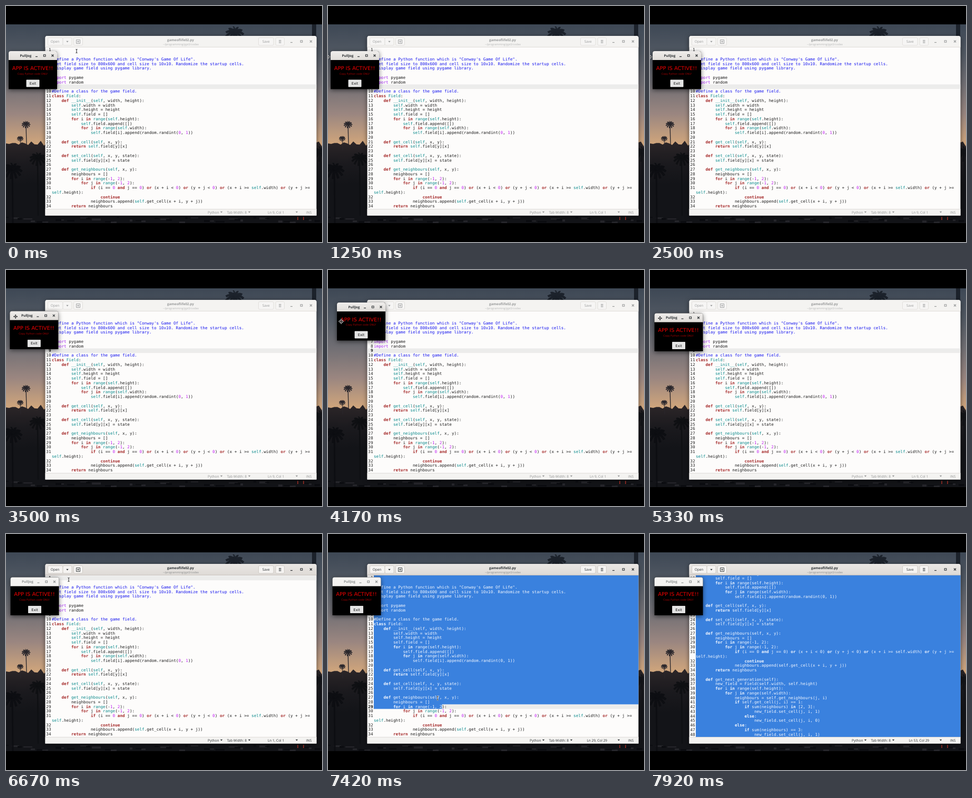
Recreate the animation shown at these times as an HTML page with a canvas. Size 600 by 450 pixels, loop 8000 ms.

```html
<!DOCTYPE html>
<html lang="en">
<head>
<meta charset="utf-8">
<title>Code editor</title>
<style>
html, body { margin: 0; width: 100%; height: 100%; overflow: hidden; background: #000; }
canvas { display: block; width: 600px; height: 450px; }
</style>
</head>
<body>
<canvas id="stage" width="600" height="450"></canvas>
<script>
const ctx = document.getElementById('stage').getContext('2d');
ctx.textRendering = 'geometricPrecision';

const LOOP = 8000, TICK = 1000 / 12;
const CODE_X = 87, CHAR_W = 4.623, ROW_H = 8.76, ROW_Y = 83.8;
const MONO = '7.68px "DejaVu Sans Mono", monospace';
const UI = '"Open Sans", sans-serif';
const BLUE = '#3a81de';
const FOCUS_AT = 5650, SELECT_AT = 6750;

const SOURCE = `

#Define a Python function which is "Conway's Game Of Life".
#Set field size to 800x600 and cell size to 10x10. Randomize the startup cells.
#Display game field using pygame library.

import pygame
import random

#Define a class for the game field.
class Field:
    def __init__(self, width, height):
        self.width = width
        self.height = height
        self.field = []
        for i in range(self.height):
            self.field.append([])
            for j in range(self.width):
                self.field[i].append(random.randint(0, 1))

    def get_cell(self, x, y):
        return self.field[y][x]

    def set_cell(self, x, y, state):
        self.field[y][x] = state

    def get_neighbours(self, x, y):
        neighbours = []
        for i in range(-1, 2):
            for j in range(-1, 2):
                if (i == 0 and j == 0) or (x + i < 0) or (y + j < 0) or (x + i >= self.width) or (y + j >=
~self.height):
                    continue
                neighbours.append(self.get_cell(x + i, y + j))
        return neighbours

    def get_next_generation(self):
        new_field = Field(self.width, self.height)
        for i in range(self.height):
            for j in range(self.width):
                neighbours = self.get_neighbours(j, i)
                if self.get_cell(j, i) == 1:
                    if sum(neighbours) in [2, 3]:
                        new_field.set_cell(j, i, 1)
                    else:
                        new_field.set_cell(j, i, 0)
                else:
                    if sum(neighbours) == 3:
                        new_field.set_cell(j, i, 1)`;

const KEYWORD = /^(def|class|for|in|if|and|or|return|continue|else)$/;

function tokenize(line) {
  let previous = '';
  return [...line.matchAll(/#.*|\w+|[^\w\s]+/g)].map(match => {
    const word = match[0];
    let color = '#1c1c1c', bold = false;
    if (word[0] === '#') color = '#1414ee';
    else if (KEYWORD.test(word)) { color = '#a52a2a'; bold = true; }
    else if (word === 'import') color = '#a020f0';
    else if (/^\d+$/.test(word)) color = '#c01cf4';
    else if (/^(self|range|sum)$/.test(word) || /^(def|class)$/.test(previous)) color = '#0b8a8c';
    previous = word;
    return { word, color, bold, col: match.index };
  });
}

// A leading "~" marks the wrapped rest of the line above.
let lineCount = 0;
const rows = SOURCE.split('\n').map(line => {
  const wrapped = line[0] === '~';
  return { number: wrapped ? '' : ++lineCount, tokens: tokenize(line.replace('~', '')) };
});
const WRAPPED_ROW = rows.findIndex(row => row.number === '');

const clamp = (v, lo, hi) => Math.min(hi, Math.max(lo, v));

// Eased value between keys of the form [time, ...values].
function track(t, keys) {
  let i = 0;
  while (i < keys.length - 2 && t >= keys[i + 1][0]) i++;
  const [a, b] = [keys[i], keys[i + 1]];
  const u = clamp((t - a[0]) / (b[0] - a[0]), 0, 1);
  const eased = u * u * (3 - 2 * u);
  return a.slice(1).map((v, k) => v + (b[k + 1] - v) * eased);
}

function rect(x, y, w, h, fill, radius = 0, stroke) {
  ctx.beginPath();
  ctx.roundRect(x, y, w, h, radius);
  ctx.fillStyle = fill;
  ctx.fill();
  if (stroke) { ctx.strokeStyle = stroke; ctx.lineWidth = 0.8; ctx.stroke(); }
}

function text(str, x, y, font, color, align = 'left') {
  ctx.font = font;
  ctx.fillStyle = color;
  ctx.textAlign = align;
  ctx.fillText(str, x, y);
}

function lines(color, width, ...paths) {
  ctx.strokeStyle = color;
  ctx.lineWidth = width;
  ctx.beginPath();
  for (const [x, y, ...rest] of paths) {
    ctx.moveTo(x, y);
    for (let i = 0; i < rest.length; i += 2) ctx.lineTo(rest[i], rest[i + 1]);
  }
  ctx.stroke();
}

function polygon(color, ...points) {
  ctx.fillStyle = color;
  ctx.beginPath();
  for (let i = 0; i < points.length; i += 2) ctx.lineTo(points[i], points[i + 1]);
  ctx.fill();
}

function gradient(y0, y1, ...colors) {
  const g = ctx.createLinearGradient(0, y0, 0, y1);
  colors.forEach((c, i) => g.addColorStop(i / (colors.length - 1), c));
  return g;
}

function withShadow(blur, draw) {
  ctx.save();
  ctx.shadowColor = 'rgba(0,0,0,.55)';
  ctx.shadowBlur = blur;
  ctx.shadowOffsetY = 2;
  draw();
  ctx.restore();
}

function palm(x, y, radius, base, color) {
  lines(color, radius / 6, [x, y, x + 1, base]);
  ctx.lineWidth = radius / 4;
  for (let i = 0; i < 11; i++) {
    const a = i / 11 * Math.PI * 2;
    const endX = x + Math.cos(a) * radius, endY = y + Math.sin(a) * radius * 0.8;
    ctx.beginPath();
    ctx.moveTo(x, y);
    ctx.quadraticCurveTo((x + endX) / 2, (y + endY) / 2 - radius * 0.25, endX, endY + radius * 0.2);
    ctx.stroke();
  }
}

function drawBackdrop() {
  rect(0, 0, 600, 450, '#000');
  ctx.save();
  ctx.beginPath();
  ctx.rect(0, 35, 600, 379);
  ctx.clip();
  rect(0, 35, 600, 379, gradient(35, 262, '#3e4855', '#525963', '#716f74', '#9a8680', '#cfa57c'));
  const ridge = [];
  for (let x = 0; x <= 600; x += 6) ridge.push(x, 262 + 4 * Math.sin(x * 0.37) + 3 * Math.sin(x * 1.7));
  polygon(gradient(258, 340, '#2c2628', '#1b1a1e', '#131418'), 0, 414, ...ridge, 600, 414);
  for (let i = 0; i < 40; i++) {
    rect((i * 47) % 600, 402 + (i * 7) % 10, 5 + i % 5 * 3, 2 + i % 3, i % 2 ? '#26262b' : '#0c0d11');
  }
  rect(553, 402, 2, 6, '#8a2a24');
  rect(564, 402, 2, 6, '#8a2a24');
  palm(38, 225, 8, 264, '#2a272c');
  palm(27, 252, 6, 275, '#2a272c');
  palm(60, 290, 15, 400, '#0f1013');
  palm(12, 312, 18, 414, '#0d0e12');
  palm(597, 280, 17, 414, '#131418');
  palm(434, 51, 17, 80, '#1c222b');
  rect(581, 35, 8, 24, '#1c222b');
  ctx.restore();
}

function windowButtons(xMin, xMax, xClose, y, color) {
  lines(color, 1.2, [xMin - 2, y + 2, xMin + 2, y + 2]);
  lines(color, 1.1, [xMax - 1.8, y - 1.8, xMax + 1.8, y - 1.8, xMax + 1.8, y + 1.8, xMax - 1.8, y + 1.8, xMax - 1.8, y - 2.2]);
  lines(color, 1.1, [xClose - 2, y - 2, xClose + 2, y + 2], [xClose + 2, y - 2, xClose - 2, y + 2]);
}

const arrowDown = (x, y, color) => polygon(color, x - 2.2, y - 1.2, x + 2.2, y - 1.2, x, y + 1.6);

function drawHeader(active) {
  const ink = active ? '#2c3134' : '#989a9a';
  const border = active ? '#c9c4be' : '#dedbd7';
  rect(74.5, 57, 515, 21.5, active ? gradient(57, 78, '#eae7e4', '#dedad6') : '#f4f3f1', [4, 4, 0, 0]);
  lines(active ? '#bfb8b1' : '#d9d5d0', 0.8, [74.5, 78.4, 589.5, 78.4]);
  for (const [x, w] of [[79.5, 28.5], [108, 17], [128.5, 17], [479.5, 28.5], [512, 16.5]]) {
    rect(x, 60.5, w, 14.5, active ? '#f5f3f1' : '#f6f5f4', 2, border);
  }
  text('Open', 93, 70.4, `6.5px ${UI}`, ink, 'center');
  text('Save', 493.7, 70.4, `6.5px ${UI}`, ink, 'center');
  arrowDown(116.5, 68, ink);
  lines(ink, 0.9, [133.5, 64.5, 140.5, 64.5, 140.5, 71.5, 133.5, 71.5, 133.5, 64.5], [137, 66, 137, 70], [135, 68, 139, 68]);
  lines(ink, 1, [518, 65.5, 522.5, 65.5], [518, 67.8, 522.5, 67.8], [518, 70.1, 522.5, 70.1]);
  text('gameoflife02.py', 331.5, 66.8, `700 6.4px ${UI}`, ink, 'center');
  text('~/programming/gpt3/codex', 332, 74.5, `5.3px ${UI}`, active ? '#888a8a' : '#b5b6b6', 'center');
  windowButtons(542, 561, 579, 67.5, ink);
}

function drawStatus(active, line, col) {
  const ink = active ? '#2c3134' : '#929494', font = `6.5px ${UI}`;
  rect(74.5, 387, 515, 12.5, '#f4f3f1');
  lines('#dad6d2', 0.8, [74.5, 387.4, 589.5, 387.4]);
  text('Python', 383, 395.7, font, ink);
  text('Tab Width: 8', 419.5, 395.7, font, ink);
  text(`Ln ${line}, Col ${col}`, line > 9 ? 491.5 : 497, 395.7, font, ink);
  text('INS', 570, 395.7, font, ink);
  for (const x of [409, 462, 552]) arrowDown(x, 393, ink);
}

function drawRows(scroll, forcedColor) {
  rows.forEach((row, i) => {
    const y = ROW_Y + (i - scroll) * ROW_H + 2.6;
    if (y < 72 || y > 396) return;
    for (const { word, color, bold, col } of row.tokens) {
      text(word, CODE_X + col * CHAR_W, y, (bold ? 'bold ' : '') + MONO, forcedColor || color);
    }
  });
}

function drawEditor(t) {
  const active = t >= FOCUS_AT;
  const [scroll] = track(t, [[7560, 0], [7910, 13.95]]);
  const [selRow, selCol] = track(t, [[SELECT_AT, 0, 0], [7420, 28, 28], [7600, 36, 28], [7910, 53, 28]]).map(Math.round);
  const currentRow = active ? selRow : 8;
  const rowTop = i => ROW_Y + (i - scroll - 0.5) * ROW_H;

  withShadow(9, () => rect(74.5, 57, 515, 342.5, '#fdfcfb', [4, 4, 0, 0]));
  ctx.save();
  ctx.beginPath();
  ctx.rect(74.5, 78, 515, 309);
  ctx.clip();
  rect(74.5, rowTop(currentRow), 515, ROW_H, '#ececeb');
  rows.forEach(({ number }, i) => {
    const weight = i === currentRow ? 'bold ' : '';
    text(number, 85.5, rowTop(i) + ROW_H / 2 + 2.6, weight + MONO, '#1c1c1c', 'right');
  });
  drawRows(scroll);
  if (t > SELECT_AT) {
    ctx.beginPath();
    ctx.rect(CODE_X, rowTop(0) - 1, 503, selRow * ROW_H + 1);
    ctx.rect(CODE_X, rowTop(selRow), selCol * CHAR_W, ROW_H);
    ctx.clip();
    ctx.fillStyle = BLUE;
    ctx.fillRect(CODE_X, 78, 503, 309);
    drawRows(scroll, '#f4f8ff');
  }
  ctx.restore();
  drawHeader(active);
  const line = currentRow + (currentRow < WRAPPED_ROW ? 1 : 0);
  drawStatus(active, line, active ? selCol + 1 : 1);
}

function drawPopup(t) {
  const [x, y] = track(t, [[3300, 5, 86], [3900, 14, 57], [4080, 16, 58], [4167, 17, 62], [4500, 8.5, 82.5]]);
  const active = t < FOCUS_AT, ink = active ? '#2c3134' : '#8d9090';
  const dejavu = '"DejaVu Sans", sans-serif';
  ctx.save();
  ctx.translate(x, y);
  withShadow(8, () => rect(0, 0, 92, 72.5, '#000', [4, 4, 0, 0]));
  rect(0, 0, 92, 17, active ? gradient(0, 17, '#efedeb', '#e0ddd9') : '#f4f3f1', [4, 4, 0, 0]);
  text('PullJog', 32.5, 10.9, `700 6.4px ${UI}`, ink, 'center');
  windowButtons(53, 68.2, 83.5, 8.5, ink);
  text('APP IS ACTIVE!!', 45.5, 35.9, `9.9px ${dejavu}`, '#f00000', 'center');
  text('Copy Python code ONLY', 45.5, 44.5, `4.8px ${dejavu}`, '#a80000', 'center');
  rect(34, 55, 24, 13, '#e4e4e4', 0, '#fafafa');
  text('Exit', 46, 64, `6.7px ${dejavu}`, '#111', 'center');
  ctx.restore();
}

function drawPointer(t) {
  const [x, y] = track(t, [
    [0, 134, 86], [420, -1, 97], [2500, -1, 97], [3000, 16, 96], [3300, 16, 96],
    [3900, 24, 68], [4167, 25, 98], [4500, 19, 92], [5400, 19, 92], [5640, 119, 87],
    [SELECT_AT, 119, 87], [7420, 208, 313], [7830, 205, 460]
  ]);
  ctx.save();
  ctx.translate(x, y);
  if (t < 250 || t > 5500) {
    const beam = [[-1.6, -3.6, 0, -3, 1.6, -3.6], [0, -3, 0, 3], [-1.6, 3.6, 0, 3, 1.6, 3.6]];
    lines('#fff', 2.2, ...beam);
    lines('#222', 1, ...beam);
  } else {
    for (let i = 0; i < 4; i++) {
      ctx.rotate(Math.PI / 2);
      polygon('#fff', -2.8, -1.4, 0, -5.2, 2.8, -1.4);
      polygon('#222', -1.8, -2, 0, -4.3, 1.8, -2);
    }
    lines('#222', 1, [-2.5, 0, 2.5, 0], [0, -2.5, 0, 2.5]);
  }
  ctx.restore();
}

const start = performance.now();

function frame() {
  const elapsed = (performance.now() - start) % LOOP;
  const t = Math.floor((elapsed + 4) / TICK) * TICK % LOOP;
  drawBackdrop();
  drawEditor(t);
  drawPopup(t);
  drawPointer(t);
  requestAnimationFrame(frame);
}
frame();
</script>
</body>
</html>
```
